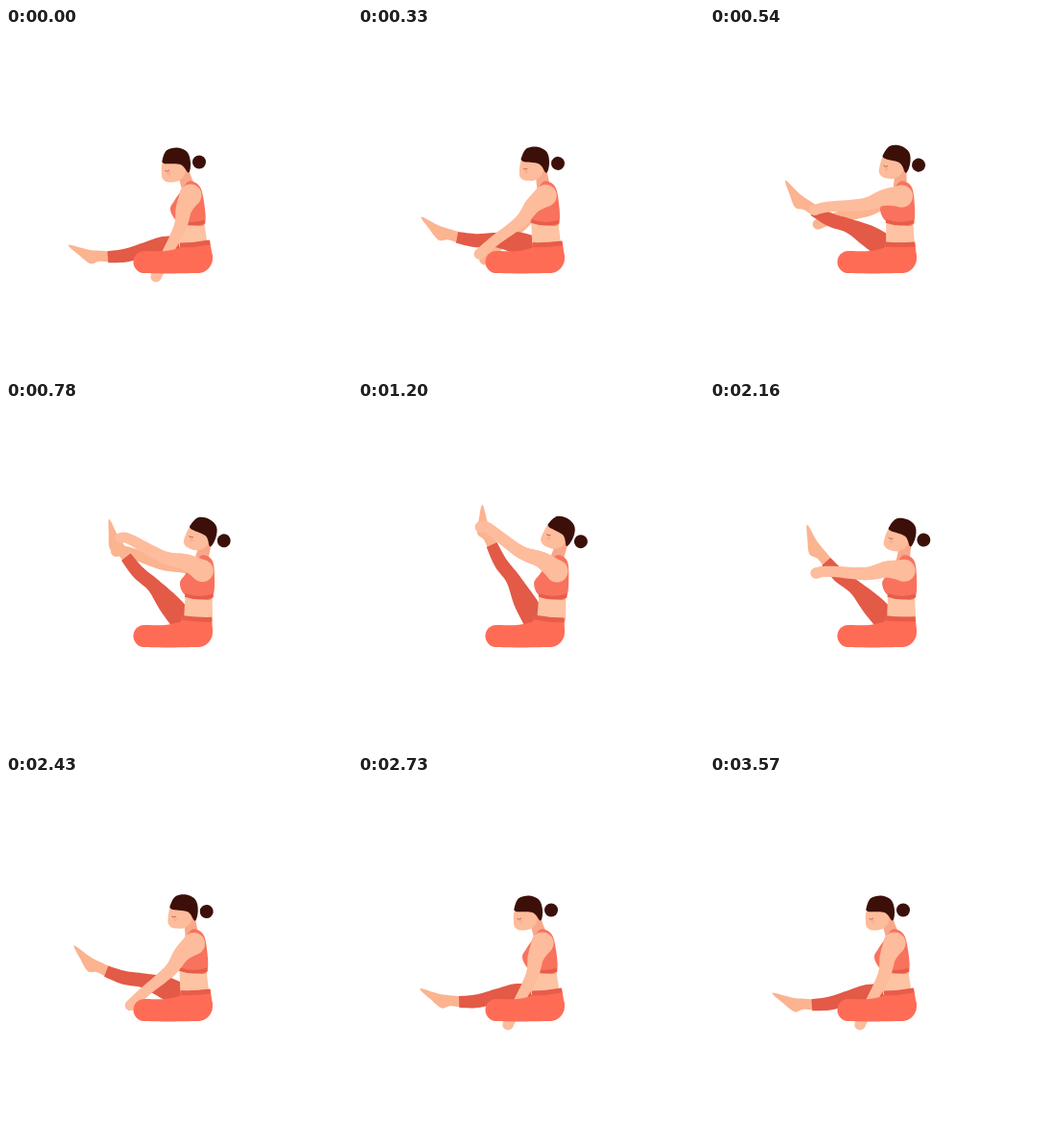
Recreate the animation shown at these times as an HTML page with a canvas. Size 360 px wide and 360 px high, loop 3600 ms.

```html
<!DOCTYPE html>
<html lang="en">
<head>
<meta charset="utf-8">
<title>Seated leg raise</title>
<style>
html, body { margin: 0; width: 100%; height: 100%; overflow: hidden; background: #fff; }
canvas { display: block; width: 360px; height: 360px; }
</style>
</head>
<body>
<canvas id="stage" width="360" height="360"></canvas>
<script>
const ctx = document.getElementById('stage').getContext('2d');
const LOOP = 3600, STEP = 30;
const SKIN = '#fdbc9c', SKIN_FAR = '#fbb390', BELLY = '#fdc3a3', NECK = '#f8a88a';
const PANTS = '#ff6c56', PANTS_FAR = '#e35a47', BAND = '#e75d49', TOP = '#f8725d';
const HAIR = '#3c1009', LASHES = '#b0664f';

const mix = (a, b, k) => a + (b - a) * k;
const mixPoint = (p, q, k) => [mix(p[0], q[0], k), mix(p[1], q[1], k)];
const rad = deg => deg * Math.PI / 180;
const polar = ([x, y], deg, len) => [x - len * Math.cos(rad(deg)), y - len * Math.sin(rad(deg))];

// Sine ease from 0 to 1 between two times.
function ease(t, from, to) {
  const u = Math.max(0, Math.min(1, (t - from) / (to - from)));
  return (1 - Math.cos(Math.PI * u)) / 2;
}

// Rise from the loop start until `top`, hold, then sink from `leave` to `end`.
const lift = (t, top, leave, end) => ease(t, 0, top) - ease(t, leave, end);

// Smooth closed shape through the given points.
function blob(points, color) {
  const n = points.length, at = i => points[(i + n) % n];
  ctx.beginPath();
  ctx.moveTo(...at(0));
  for (let i = 0; i < n; i++) {
    const [a, b, c, d] = [at(i - 1), at(i), at(i + 1), at(i + 2)];
    ctx.bezierCurveTo(b[0] + (c[0] - a[0]) / 6, b[1] + (c[1] - a[1]) / 6,
      c[0] - (d[0] - b[0]) / 6, c[1] - (d[1] - b[1]) / 6, c[0], c[1]);
  }
  ctx.fillStyle = color;
  ctx.fill();
}

function polygon(points, color) {
  ctx.beginPath();
  points.forEach(p => ctx.lineTo(...p));
  ctx.fillStyle = color;
  ctx.fill();
}

function disc([x, y], r, color) {
  ctx.beginPath();
  ctx.arc(x, y, r, 0, Math.PI * 2);
  ctx.fillStyle = color;
  ctx.fill();
}

function curve(start, control, end, width, color) {
  ctx.beginPath();
  ctx.moveTo(...start);
  ctx.quadraticCurveTo(...control, ...end);
  ctx.lineWidth = width;
  ctx.strokeStyle = color;
  ctx.stroke();
}

// Tapered limb along joints given as [x, y, radius], round at its last joint.
function limb(joints, color, roundStart = true) {
  const last = joints.length - 1;
  const at = i => joints[Math.max(0, Math.min(last, i))];
  const line = [];
  for (let i = 0; i < last; i++) {
    for (let u = 0; u < 1; u += 0.125) {
      line.push([0, 1, 2].map(k => {
        const [a, b, c, d] = [-1, 0, 1, 2].map(o => at(i + o)[k]);
        return b + u / 2 * (c - a + u * (2 * a - 5 * b + 4 * c - d + u * (3 * (b - c) + d - a)));
      }));
    }
  }
  line.push(at(last));
  const left = [], right = [];
  line.forEach(([x, y, r], i) => {
    const p = line[Math.max(0, i - 1)], q = line[Math.min(line.length - 1, i + 1)];
    const dir = Math.atan2(q[1] - p[1], q[0] - p[0]);
    const nx = -Math.sin(dir) * r, ny = Math.cos(dir) * r;
    left.push([x + nx, y + ny]);
    right.unshift([x - nx, y - ny]);
  });
  polygon([...left, ...right], color);
  disc(at(last), at(last)[2], color);
  if (roundStart) disc(at(0), at(0)[2], color);
}

function placed([x, y], deg, paint) {
  ctx.save();
  ctx.translate(x, y);
  ctx.rotate(rad(deg));
  paint();
  ctx.restore();
}

// The upper body slides further the higher a point lies.
const leaned = ([x, y], body) => [x + 16.5 * body * (1 - (y - 160) / 108), y];

function drawArm(body, reach, color) {
  const shoulder = [192 + 15 * body, 174 + 2 * body];
  const bend = mix(-72, 28, reach), upper = mix(35, 44, reach);
  limb([
    [...shoulder, 11.5],
    [...polar(shoulder, bend + 8, upper * 0.45), 8.5],
    [...polar(shoulder, bend, upper), 6.5],
    [...polar(shoulder, mix(-68, 32, reach), mix(66, 84, reach)), 5.5],
    [...polar(shoulder, mix(-67, 30, reach), 92), 5.5]
  ], color);
}

function drawFarLeg(raise) {
  const hip = [183, 226];
  const swing = mix(-9, 60.5, raise);
  const ankle = polar(hip, swing, mix(78, 89, raise));
  const knee = polar(hip, swing + 2, mix(39, 47, raise));
  const calf = polar(mixPoint(ankle, knee, 0.5), swing - 90, 2);
  const thigh = mixPoint(knee, hip, 0.55);
  placed(ankle, 60 * raise, () => blob([
    [3, -5], [-20, -7.5], [-41, -12.5], [-30, -2], [-18, 7], [-9, 4.5], [3, 4.5]
  ], SKIN_FAR));
  limb([[...ankle, 6], [...calf, 7], [...knee, 7.5], [...thigh, 11.5], [187, 231, 13]], PANTS_FAR, false);
}

function drawTorso(body, head, turn) {
  const lean = p => leaned(p, body);
  polygon([[178, 200], [206, 200], [210, 228], [180, 228]].map(lean), BELLY);
  const jaw = polar(head, turn - 115, 16.5);
  limb([[...jaw, 6], [...lean([190, 167]), 7]], NECK);
  blob([
    [190, 159.5], [200, 163], [205, 175], [207, 203], [193, 205],
    [178, 201], [171, 189], [175, 180], [182, 170]
  ].map(lean), TOP);
  curve(...[[178, 201], [193, 206], [207, 201.5]].map(lean), 3.5, BAND);
}

function drawHead(head, turn) {
  placed(head, turn, () => {
    blob([[-13, 2], [-15.5, 18], [-12.5, 24], [-6, 25.5], [3, 23.5], [9, 15], [6, 0]], SKIN);
    disc([-8, 16.5], 2, '#fbae92');
    curve([-12, 13.5], [-10, 15], [-7.5, 13], 0.9, LASHES);
    disc([23.5, 4.5], 7, HAIR);
    blob([[-14.5, 1], [-10, -8], [1, -10.5], [11, -6], [14.5, 5], [12.5, 15.5], [4, 7], [-13, 6]], HAIR);
  });
}

function drawNearLeg(body) {
  const left = [181 + 2 * body, 225 - 2 * body];
  const right = [212 + 2.5 * body, 221 + 4 * body];
  const [x, y] = mixPoint(left, right, 0.5);
  polygon([left, right, [215, 239], [180, 239]], PANTS);
  limb([[144, 243.5, 11.5], [170, 243.5, 12], [199.5, 239.5, 15.5]], PANTS);
  curve([left[0], left[1] + 1], [x, y + 3], [right[0], right[1] + 2], 5, BAND);
}

function draw(t) {
  const body = lift(t, 1080, 1800, 2730);
  const raise = lift(t, 1080, 1830, 2850);
  const reach = lift(t, 960, 1800, 2730);
  const head = [177.5 + 35.5 * body, 135 - 4.5 * body], turn = 27 * body;
  ctx.fillStyle = '#fff';
  ctx.fillRect(0, 0, 360, 360);
  drawArm(body, body, SKIN_FAR);
  drawFarLeg(raise);
  drawTorso(body, head, turn);
  drawHead(head, turn);
  drawArm(body, reach, SKIN);
  drawNearLeg(body);
}

const start = performance.now();
function tick() {
  const t = (performance.now() - start) % LOOP;
  draw(Math.floor(t / STEP) * STEP);
  requestAnimationFrame(tick);
}
tick();
</script>
</body>
</html>
```
